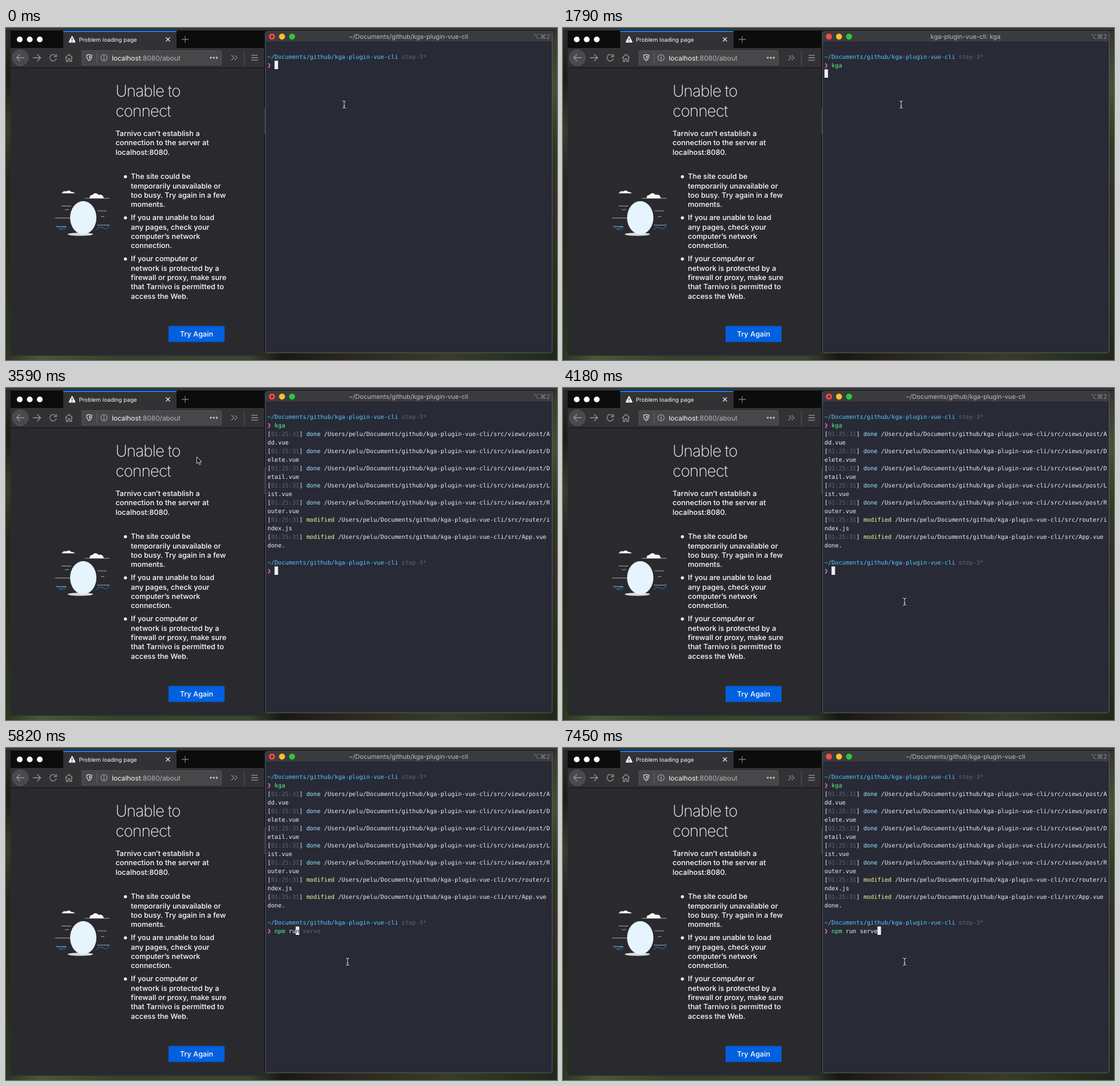
Recreate the animation shown at these times as an HTML page. Size 963x581 px, loop 8 s.

```html
<!DOCTYPE html>
<html lang="en">
<head>
<meta charset="utf-8">
<title>Terminal and browser</title>
<style>
html, body { margin: 0; width: 100%; height: 100%; overflow: hidden; background: #1b1e18; }
svg { display: block; width: 963px; height: 581px; }
text { font-family: Inter, Roboto, sans-serif; text-rendering: geometricPrecision; white-space: pre; }
#term text { font: 10.25px "DejaVu Sans Mono", "Liberation Mono", monospace; }
.icon { fill: none; stroke: #98989a; stroke-width: 1.3; }
.body { font-size: 12.7px; font-weight: 500; fill: #fff; }
.head { font-size: 28px; font-weight: 200; letter-spacing: -1.05px; fill: #f9f9fa; }
</style>
</head>
<body>
<svg viewBox="0 0 963 581">
  <defs>
    <linearGradient id="left" x2="0" y2="1">
      <stop offset="0" stop-color="#2c2e28"/><stop offset=".15" stop-color="#1b1e14"/>
      <stop offset=".3" stop-color="#3a3c2a"/><stop offset=".45" stop-color="#2a251d"/>
      <stop offset=".65" stop-color="#232b19"/><stop offset="1" stop-color="#2a3620"/>
    </linearGradient>
    <linearGradient id="right" x2="0" y2="1">
      <stop offset="0" stop-color="#34352c"/><stop offset=".18" stop-color="#465034"/>
      <stop offset=".35" stop-color="#2f3a22"/><stop offset=".55" stop-color="#332e24"/>
      <stop offset=".8" stop-color="#25331a"/><stop offset="1" stop-color="#20291a"/>
    </linearGradient>
    <linearGradient id="floor">
      <stop offset="0" stop-color="#2a3620"/><stop offset=".06" stop-color="#4a5738"/>
      <stop offset=".2" stop-color="#35412a"/><stop offset=".44" stop-color="#3a4630"/>
      <stop offset=".5" stop-color="#161812"/><stop offset=".6" stop-color="#2a251c"/>
      <stop offset=".8" stop-color="#363d28"/><stop offset="1" stop-color="#20291a"/>
    </linearGradient>
  </defs>

  <!-- desktop -->
  <rect width="12" height="581" fill="url(#left)"/>
  <rect x="948" width="15" height="581" fill="url(#right)"/>
  <rect y="564" width="963" height="17" fill="url(#floor)"/>
  <rect x="440" y="0" width="24" height="566" fill="#15161a"/>
  <rect x="451" y="139" width="2" height="47" fill="#35363a"/>
  <rect width="963" height="5" fill="#343537"/>
  <rect y="4" width="963" height="1" fill="#1a1a1b"/>

  <!-- browser -->
  <path d="M8 5H451V569Q451 573.500 446.500 573.500H12.500Q8 573.500 8 569Z" fill="#2a2a2e"/>
  <rect x="8" y="5" width="443" height="30" fill="#0c0c0d"/>
  <g fill="#fff"><circle cx="24" cy="20" r="5.100"/><circle cx="41.500" cy="20" r="5.100"/><circle cx="59" cy="20" r="5.100"/></g>
  <rect x="100" y="5" width="198" height="30" fill="#323234"/>
  <rect x="100" y="5" width="198" height="2" fill="#0a84ff"/>
  <path d="M115.500 15L120.500 24.500H110.500Z" fill="#f9f9fa" stroke="#f9f9fa" stroke-width="1.800" stroke-linejoin="round"/>
  <path d="M115.500 17.500V21.300M115.500 22.600V24" stroke="#323234" stroke-width="1.500"/>
  <text x="127.500" y="24" font-size="9.800" fill="#f9f9fa">Problem loading page</text>
  <path class="icon" d="M279.500 16.500L286.500 23.500M286.500 16.500L279.500 23.500" style="stroke:#f0f0f2"/>
  <path class="icon" d="M307 20H319.500M313.200 14V26" style="stroke:#77777a"/>
  <rect x="8" y="35" width="443" height="35" fill="#323234"/>
  <rect x="8" y="69" width="443" height="1" fill="#0f0f10"/>
  <circle cx="25" cy="52" r="14" fill="#4a4a4c" stroke="#5c5c5e" stroke-width=".8"/>
  <path class="icon" d="M32 52H19M24.500 46L18.500 52L24.500 58"/>
  <path class="icon" d="M47 52H60M54.500 46L60.500 52L54.500 58"/>
  <path class="icon" d="M87 48.500A5.700 5.700 0 1 0 88 53.500M88.200 45.500V50H83.700"/>
  <path class="icon" d="M103.500 52.500L110 46L116.500 52.500M105.500 51.500V58.500H108.500V54H111.500V58.500H114.500V51.500"/>
  <rect x="132.500" y="39.500" width="244" height="25.500" rx="2" fill="#474749" stroke="#5a5a5c" stroke-width=".8"/>
  <path class="icon" d="M141 47.500L145.500 46.300L150 47.500Q150 54.500 145.500 57.300Q141 54.500 141 47.500Z" style="stroke:#d8d8da"/>
  <path d="M145.500 48.700V55Q148 52.500 148 49.300Z" fill="#d8d8da"/>
  <rect x="158.500" y="42" width="1" height="20" fill="#66666a"/>
  <circle class="icon" cx="171.300" cy="52" r="5.500" style="stroke:#b4b4b6;stroke-width:1.100"/>
  <path class="icon" d="M171.300 51V55.300M171.300 48.500V50" style="stroke:#b4b4b6"/>
  <text x="185" y="56.500" font-size="11.850" fill="#f9f9fa">localhost<tspan fill="#b5b5b8">:8080/about</tspan></text>
  <g fill="#c8c8ca"><circle cx="358" cy="52" r="1.700"/><circle cx="363.200" cy="52" r="1.700"/><circle cx="368.400" cy="52" r="1.700"/></g>
  <path class="icon" d="M394 47.500L398.500 52L394 56.500M399.500 47.500L404 52L399.500 56.500" style="stroke:#88888a"/>
  <rect x="416" y="38" width="1" height="28" fill="#525254"/>
  <path class="icon" d="M429 47.700H440M429 52H440M429 56.300H440"/>

  <!-- page -->
  <g id="page"></g>
  <rect x="284" y="521.500" width="98" height="28" rx="1.500" fill="#0060df"/>
  <text class="body" x="333" y="540.300" text-anchor="middle">Try Again</text>
  <g stroke="#a9abb0" stroke-width="1" fill="none">
    <path d="M97 289H121M138 298H181M97 311.500H114M103 318H110M86 332.500H113M88 347.500H105M160 320H176M166 330H172M159 345H181"/>
    <path d="M88 345Q93 356 104 351M94 353Q99 347 106 349M158 353Q164 346 170 350T180 346" stroke="#1586c9"/>
  </g>
  <path d="M98 289Q100 284 105 286Q111 282 114 287Q118 286 119 289Z" fill="#f6f6f8"/>
  <path d="M146 298Q146 292 151 292Q156 286 162 292Q169 290 171 298Z" fill="#f6f6f8"/>
  <ellipse cx="130" cy="361" rx="22" ry="2.700" fill="#d9dbdd"/>
  <ellipse cx="135" cy="332" rx="23" ry="29" fill="#e6f4fd"/>

  <!-- terminal -->
  <path d="M453.500 10Q453.500 6 457.500 6H950.500Q954.500 6 954.500 10V564Q954.500 568.500 950 568.500H458Q453.500 568.500 453.500 564Z" fill="#282a36" stroke="#5b5d63"/>
  <path d="M454 25V10.500Q454 6.500 458 6.500H950Q954 6.500 954 10.500V25Z" fill="#3a3b3e"/>
  <rect x="454" y="24.500" width="500" height="1" fill="#1c1d22"/>
  <circle cx="464.800" cy="15" r="5.300" fill="#fc4a48"/>
  <circle cx="482.400" cy="15" r="5.300" fill="#fdbc2e"/>
  <circle cx="500" cy="15" r="5.300" fill="#2fc53a"/>
  <circle id="dot" cx="464.900" cy="15" r="1.900" fill="#710c0b"/>
  <text id="title" x="703.500" y="19.200" font-size="11.080" text-anchor="middle" fill="#bdbdc0"></text>
  <text x="951" y="19.200" font-size="11.200" text-anchor="end" fill="#87888c" style="font-family:Inter,'DejaVu Sans',sans-serif">⌥⌘2</text>
  <g id="term"></g>

  <path id="arrow" d="M0 0V11.700L2.700 9.200L4.600 13.500L6.500 12.700L4.700 8.500H8.300Z" fill="#0b0b0c" stroke="#f4f4f4" stroke-width=".9"/>
  <g id="beam" fill="none">
    <path d="M-3 -6.500Q0 -6.500 0 -4.500Q0 -6.500 3 -6.500M0 -5V5M-3 6.500Q0 6.500 0 4.500Q0 6.500 3 6.500M-1.500 2H1.500" stroke="#111218" stroke-width="2.400"/>
    <path d="M-3 -6.500Q0 -6.500 0 -4.500Q0 -6.500 3 -6.500M0 -5V5M-3 6.500Q0 6.500 0 4.500Q0 6.500 3 6.500M-1.500 2H1.500" stroke="#e8e8ea" stroke-width="1"/>
  </g>
</svg>
<script>
const $ = id => document.getElementById(id);
const LOOP = 8000;
const LEFT = 457, TOP = 42, ROW = 15, COL = 6.171, COLS = 80;
const INK = { fg: '#eff0eb', dim: '#63656d', path: '#57c7ff', ok: '#5af78e', bad: '#ff5c57',
  done: '#9aedfe', modified: '#f3f99d', block: '#282a36', mark: '#ff6ac1' };

// Browser page text: [x, first baseline, class, line height, lines]
const page = [
  [191.5, 120, 'head', 35.3, ['Unable to', 'connect']],
  [191.5, 189, 'body', 16.35, ['Tarnivo can’t establish a', 'connection to the server at', 'localhost:8080.']],
  [218.3, 264.3, 'body', 16.35, ['The site could be', 'temporarily unavailable or', 'too busy. Try again in a few', 'moments.']],
  [218.3, 336.3, 'body', 16.35, ['If you are unable to load', 'any pages, check your', 'computer’s network', 'connection.']],
  [218.3, 408.3, 'body', 16.35, ['If your computer or', 'network is protected by a', 'firewall or proxy, make sure', 'that Tarnivo is permitted to', 'access the Web.']]
];
$('page').innerHTML = page.map(([x, y, cls, step, lines], i) =>
  lines.map((s, k) => `<text class="${cls}" x="${x}" y="${y + k * step}">${s}</text>`).join('') +
  (i > 1 ? `<circle cx="208.700" cy="${y - 4}" r="2.700" fill="#f9f9fa"/>` : '')).join('');

// Terminal rows are lists of [ink, string, underline]
const row = (r, segs) => `<text x="${LEFT}" y="${TOP + r * ROW + 12}">` + segs.map(([ink, s, line]) =>
  `<tspan fill="${INK[ink]}"${line ? ' text-decoration="underline"' : ''}>${s}</tspan>`).join('') + '</text>';

const block = (r, c) =>
  `<rect x="${LEFT + c * COL}" y="${TOP + r * ROW + .3}" width="${COL}" height="14.700" fill="${INK.fg}"/>`;

function prompt(r, cmd, n) {
  const word = cmd.split(' ')[0].length;
  const typed = cmd.slice(0, n), hint = n ? cmd.slice(n) : '';
  const prefix = typed === 'n';
  const ink = n >= word ? 'ok' : prefix ? 'fg' : 'bad';
  const y = TOP + r * ROW;
  return row(r - 1, [['path', '~/Documents/github/kga-plugin-vue-cli'], ['dim', ' step-3*']]) +
    `<path d="M458.500 ${y + 4.8}L461.300 ${y + 8.8}L458.500 ${y + 12.8}" fill="none" stroke="${INK.mark}" stroke-width="1.500"/>` +
    row(r, [['fg', '  '], [ink, typed.slice(0, word), prefix], ['fg', typed.slice(word)],
      ['block', hint.slice(0, 1)], ['dim', hint.slice(1)]]);
}

function output() {
  const base = '/Users/pelu/Documents/github/kga-plugin-vue-cli/src/';
  const files = ['Add', 'Delete', 'Detail', 'List', 'Router'].map(f => ['done', `views/post/${f}.vue`]);
  files.push(['modified', 'router/index.js'], ['modified', 'App.vue']);
  let r = 2, out = '';
  for (const [kind, file] of files) {
    const path = base + file, room = COLS - 12 - kind.length;
    out += row(r++, [['fg', '['], ['dim', '01:25:31'], ['fg', '] '], [kind, kind], ['fg', ' ' + path.slice(0, room)]]);
    if (path.length > room) out += row(r++, [['fg', path.slice(room)]]);
  }
  return out + row(r, [['fg', 'done.']]);
}
const log = output();

const RUN = 1790, PRINT = 2390, READY = 2540;
const keys1 = [600, 1050, 1200];
const keys2 = [5080, 5230, 5380, 5530, 5680, 5820, 5970, 6110, 6260, 6560, 6710, 7010, 7150];
const mouse = [[0, 'beam', 591, 134], [3590, 'arrow', 333.5, 120.5], [3740, 'arrow', 385, 166],
  [3890, 'beam', 502, 272], [4040, 'beam', 578, 348], [4180, 'beam', 597, 374]];
const count = (keys, t) => keys.filter(k => k <= t).length;

function draw(t) {
  const n1 = count(keys1, t), n2 = count(keys2, t);
  const [r, c] = t < RUN ? [1, 2 + n1] : t < PRINT ? [2, 0] : t < READY ? [16, 0] : [18, 2 + n2];
  $('term').innerHTML = block(r, c) + prompt(1, 'kga', n1) +
    (t >= PRINT ? log : '') + (t >= READY ? prompt(18, 'npm run serve', n2) : '');
  $('title').textContent = t >= RUN && t < READY ? 'kga-plugin-vue-cli: kga' : '~/Documents/github/kga-plugin-vue-cli';
  $('dot').style.display = t < 1200 || (t >= READY && t < 7450) ? '' : 'none';
  const [, shape, x, y] = mouse.filter(m => m[0] <= t).pop();
  for (const id of ['arrow', 'beam']) $(id).style.display = id === shape ? '' : 'none';
  $(shape).setAttribute('transform', `translate(${x} ${y})`);
}

const marks = [...keys1, RUN, PRINT, READY, ...keys2, 7450, ...mouse.map(m => m[0])];
const start = performance.now();
let last = -1;
function tick() {
  const t = (performance.now() - start) % LOOP;
  const step = count(marks, t);
  if (step !== last) draw(t);
  last = step;
  requestAnimationFrame(tick);
}
tick();
</script>
</body>
</html>
```
